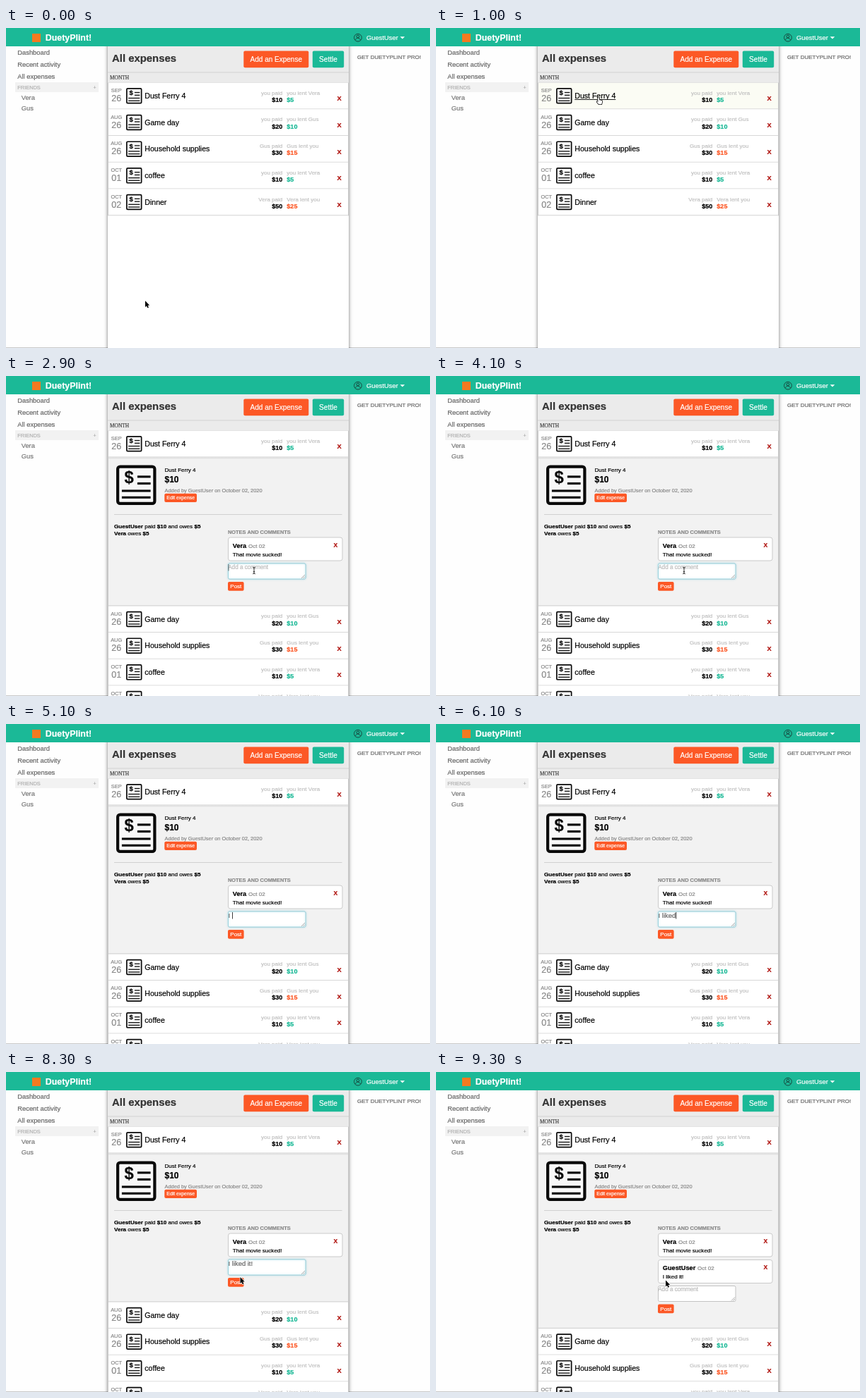
An HTML page with a canvas for the animation above (9500 ms loop, 600 by 454 pixels).

```html
<!DOCTYPE html>
<html lang="en">
<head>
<meta charset="utf-8">
<title>All expenses</title>
<style>
html, body { margin: 0; width: 100%; height: 100%; overflow: hidden; background: #fff; }
canvas { display: block; width: 600px; height: 454px; }
</style>
</head>
<body>
<canvas id="stage" width="600" height="454"></canvas>
<script>
const ctx = document.getElementById('stage').getContext('2d');
const LOOP = 9500, STEP = 100;
const TEAL = '#1bb997', ORANGE = '#fc5826', RED = '#b01410';
const OPEN_AT = 1100, FOCUS_AT = 2300, POST_AT = 8700;
const ROW_TOP = 77.7, ROW_H = 37.7, CARD_H = 37.5;
const NAME = 'GuestUser', FRIEND = 'Vera', MOVIE = 'Dust Ferry 4', COMMENT = 'I liked it!';

const rows = [
  ['SEP', '26', MOVIE, 'you paid', '$10', 'you lent Vera', '$5', TEAL],
  ['AUG', '26', 'Game day', 'you paid', '$20', 'you lent Gus', '$10', TEAL],
  ['AUG', '26', 'Household supplies', 'Gus paid', '$30', 'Gus lent you', '$15', ORANGE],
  ['OCT', '01', 'coffee', 'you paid', '$10', 'you lent Vera', '$5', TEAL],
  ['OCT', '02', 'Dinner', 'Vera paid', '$50', 'Vera lent you', '$25', ORANGE]
];
// Time of each key press in the comment box
const keys = [4800, 4900, 5700, 5800, 5900, 6000, 6100, 6300, 6500, 6700, 6900];
// Pointer path: time, x, y
const path = [
  [0, 197, 387], [1000, 229, 98.5], [1600, 229, 98.5], [2300, 351, 276], [7600, 351, 276],
  [8000, 342, 302], [8300, 331.5, 291], [8600, 325, 295.5], [LOOP, 325, 295.5]
];

// A hairline stroke gives the slightly heavy look of smoothed type
function text(str, x, y, size, color, o = {}) {
  ctx.font = `${o.bold ? 'bold ' : ''}${size}px ${o.serif ? '"Liberation Serif", serif' : '"Liberation Sans", Arial, sans-serif'}`;
  ctx.textAlign = o.align || 'left';
  ctx.fillStyle = ctx.strokeStyle = color;
  ctx.lineWidth = 0.2;
  ctx.fillText(str, x, y);
  ctx.strokeText(str, x, y);
  return x + ctx.measureText(str).width;
}

// Alternates bold and plain pieces on one line
function mixed(parts, x, y, size) {
  parts.forEach((p, i) => { x = text(p, x, y, size, '#000', { bold: i % 2 === 0 }); });
}

function rect(x, y, w, h, color) {
  ctx.fillStyle = color;
  ctx.fillRect(x, y, w, h);
}

function round(x, y, w, h, r, fill, stroke, line = 1) {
  ctx.beginPath();
  ctx.roundRect(x, y, w, h, r);
  if (fill) { ctx.fillStyle = fill; ctx.fill(); }
  if (stroke) { ctx.strokeStyle = stroke; ctx.lineWidth = line; ctx.stroke(); }
}

function poly(points, fill, stroke, line = 1) {
  ctx.beginPath();
  points.forEach(([x, y]) => ctx.lineTo(x, y));
  ctx.closePath();
  if (stroke) { ctx.strokeStyle = stroke; ctx.lineWidth = line; ctx.stroke(); }
  ctx.fillStyle = fill;
  ctx.fill();
}

function button(label, x, y, w, h, size, color, base) {
  round(x, y, w, h, 2, color);
  text(label, x + w / 2, base, size, '#fff', { align: 'center' });
}

function receipt(x, y, s) {
  const w = s * 0.075;
  round(x + w / 2, y + w / 2, s - w, s - w, s * 0.06, '#f8f8f8', '#0a0a0a', w);
  text('$', x + s * 0.32, y + s * 0.46, s * 0.42, '#0a0a0a', { bold: true, align: 'center' });
  [[0.53, 0.29], [0.53, 0.46], [0.14, 0.645], [0.14, 0.81]].forEach(([a, b]) =>
    rect(x + s * a, y + s * (b - 0.028), s * (0.86 - a), s * 0.056, '#0a0a0a'));
}

function sidebar() {
  ['Dashboard', 'Recent activity', 'All expenses'].forEach((s, i) =>
    text(s, 16.3, 38.3 + i * 16.8, 9.35, '#666'));
  rect(13, 77, 118, 14, '#f2f2f2');
  text('FRIENDS', 16.3, 86.7, 7.4, '#b0b0b0');
  text('+', 123.5, 86.5, 7, '#aaa');
  text(FRIEND, 21.7, 101.8, 9.35, '#777');
  text('Gus', 21.7, 116.8, 9.35, '#777');
  text('GET DUETYPLINT PRO!', 497, 44, 8, '#666');
}

function topbar() {
  rect(0, 0, 600, 26, TEAL);
  rect(37, 8, 12, 12, '#f47a20');
  text('DuetyPlint!', 55.8, 18.2, 12.4, '#fff', { bold: true });
  ctx.strokeStyle = '#174a40';
  ctx.lineWidth = 1;
  ctx.beginPath();
  ctx.arc(498, 13.7, 5.4, 0, 7);
  ctx.stroke();
  ctx.beginPath();
  ctx.arc(498, 12, 1.9, 0, 7);
  ctx.stroke();
  ctx.beginPath();
  ctx.arc(498, 18, 3.6, Math.PI * 1.1, Math.PI * 1.9);
  ctx.stroke();
  text(NAME, 510, 16.5, 9.4, '#fff');
  poly([[557.7, 12.3], [564.3, 12.3], [561, 15.6]], '#fff');
}

function panel() {
  ctx.save();
  ctx.shadowColor = 'rgba(0,0,0,.55)';
  ctx.shadowBlur = 5;
  rect(144, 20, 341, 460, '#fff');
  ctx.restore();
  rect(144, 26, 341, 52, '#ebebeb');
  rect(144, 62.5, 341, 1, '#d2d2d2');
  rect(144, 77, 341, 1, '#d8d8d8');
  text('All expenses', 150, 48.2, 14.9, '#333', { bold: true });
  button('Add an Expense', 336.3, 32.6, 92, 23.7, 10, ORANGE, 48);
  button('Settle', 433.8, 32.6, 44.4, 23.7, 10.1, TEAL, 48);
  text('MONTH', 147, 73, 7.4, '#444', { serif: true });
}

function drawRow([month, day, title, paid, sum, lent, share, color], y, hover) {
  rect(144, y, 341, ROW_H, hover ? '#fbfcf4' : '#fff');
  rect(144, y + ROW_H - 1, 341, 1, '#d4d4d4');
  text(month, 156.2, y + 13.3, 7.4, '#888', { align: 'center' });
  text(day, 156.2, y + 26.3, 12.5, '#888', { align: 'center' });
  receipt(170, y + 7.3, 22.5);
  const end = text(title, 196.3, y + 22.2, 10.55, '#000');
  if (hover) rect(196.3, y + 23.3, end - 196.3, 1, '#222');
  text(paid, 391.3, y + 17, 8.05, '#c0c0c0', { align: 'right' });
  text(sum, 391.3, y + 27.3, 9.1, '#000', { bold: true, align: 'right' });
  text(lent, 397.3, y + 17, 8.05, '#c0c0c0');
  text(share, 397.3, y + 27.3, 9.1, color, { bold: true });
  text('X', 468.5, y + 25.5, 9.3, RED, { bold: true });
}

function card(name, body, y) {
  round(314.5, y + 0.5, 161.5, 33, 3, '#fff', '#cacaca');
  const end = text(name, 320.8, y + 15, 9.2, '#000', { bold: true });
  text('Oct 02', end + 2.8, y + 15, 8, '#888');
  text(body, 320.8, y + 27, 8.05, '#000');
  text('X', 463.6, y + 14.2, 8.6, RED, { bold: true });
}

// Blink restarts at each key press, with short fades
function caretAlpha(t) {
  if (t < 2500 || t >= 8300) return 0;
  const age = t - keys.reduce((last, k) => (k <= t ? k : last), 2500);
  if (age < 400) return 1;
  const p = age % 1000;
  if (p <= 200) return (p + 100) / 300;
  return p < 400 ? 1 : Math.max(0, (600 - p) / 267);
}

function commentBox(t, y) {
  const focus = t >= POST_AT ? 0 : Math.max(0, Math.min(1, (t - FOCUS_AT) / 300));
  round(314.5, y + 0.5, 109.5, 22, 2, '#fff', '#c2c2c2');
  if (focus) {
    ctx.save();
    ctx.globalAlpha = focus;
    ctx.shadowColor = 'rgba(110,200,220,.45)';
    ctx.shadowBlur = 3;
    round(314.5, y + 0.5, 109.5, 22, 2, '#fff', '#a2d6e0');
    ctx.restore();
  }
  ctx.strokeStyle = '#888';
  ctx.lineWidth = 0.7;
  ctx.beginPath();
  for (const d of [5, 2.5]) {
    ctx.moveTo(423 - d, y + 21.5);
    ctx.lineTo(423, y + 21.5 - d);
  }
  ctx.stroke();
  const typed = t >= POST_AT ? '' : COMMENT.slice(0, keys.filter(k => k <= t).length);
  let end = 314.3;
  if (typed) end = text(typed, 314.6, y + 9.2, 9.4, '#666');
  else text('Add a comment', 314.2, y + 8.2, 8.15, '#bbb');
  const a = caretAlpha(t);
  if (a) rect(end + 0.2, y + 1.5, 0.9, 9.5, `rgba(40,40,40,${a})`);
}

function details(t, bottom) {
  const top = ROW_TOP + ROW_H;
  rect(144, top, 341, bottom - top, '#f2f2f2');
  const g = ctx.createLinearGradient(0, top, 0, top + 3);
  g.addColorStop(0, 'rgba(0,0,0,.1)');
  g.addColorStop(1, 'rgba(0,0,0,0)');
  rect(144, top, 341, 3, g);
  rect(144, bottom - 1, 341, 1, '#cfcfcf');
  receipt(156, 126.5, 56.5);
  text(MOVIE, 224.5, 135.5, 8, '#000');
  text('$10', 224.5, 151.3, 12, '#000', { bold: true });
  text(`Added by ${NAME} on October 02, 2020`, 224.5, 164.6, 7.4, '#888');
  button('Edit expense', 224.3, 166.8, 45.7, 12.2, 6.85, ORANGE, 175.4);
  rect(153, 196, 322.5, 1, '#d0d0d0');
  mixed([NAME, ' paid ', '$10', ' and owes ', '$5'], 153, 216.3, 8.1);
  mixed([FRIEND, ' owes ', '$5'], 153, 225.7, 8.1);
  text('NOTES AND COMMENTS', 314, 224, 7.4, '#888', { bold: true });
  card(FRIEND, 'That movie sucked!', 228.5);
  let y = 265.5;
  if (t >= POST_AT) {
    card(NAME, COMMENT, y + 0.5);
    y += CARD_H;
  }
  commentBox(t, y);
  button('Post', 314, y + 26.5, 22.6, 12.7, 8, ORANGE, y + 35.6);
}

function pointer(t) {
  const i = path.findIndex(p => p[0] > t);
  const [t0, x0, y0] = path[i - 1], [t1, x1, y1] = path[i];
  const k = (t - t0) / (t1 - t0), e = k * k * (3 - 2 * k);
  return [x0 + (x1 - x0) * e, y0 + (y1 - y0) * e];
}

function drawPointer(x, y, kind) {
  ctx.save();
  ctx.translate(x, y);
  ctx.lineJoin = 'round';
  if (kind === 'beam') {
    ctx.strokeStyle = '#222';
    ctx.lineWidth = 0.9;
    ctx.beginPath();
    for (const s of [-1, 1]) {
      ctx.moveTo(-1.8, 4.8 * s);
      ctx.quadraticCurveTo(0, 4.8 * s, 0, 3.4 * s);
      ctx.quadraticCurveTo(0, 4.8 * s, 1.8, 4.8 * s);
    }
    ctx.moveTo(0, -4);
    ctx.lineTo(0, 4);
    ctx.moveTo(-1.2, 1.5);
    ctx.lineTo(1.2, 1.5);
    ctx.stroke();
  } else if (kind === 'hand') {
    ctx.scale(0.85, 0.85);
    poly([[0, 1], [1, 0.4], [2, 1], [2.3, 4.4], [4, 4.3], [5.6, 4.9], [7, 5.6], [7.2, 8],
      [6.2, 11.5], [1.6, 11.5], [-1.6, 7.6], [-1.5, 6.4], [-0.3, 6.7], [0.5, 7.5]], '#fff', '#111', 1.8);
  } else {
    poly([[0, 0], [0, 9], [2, 7.2], [3.4, 10.2], [4.9, 9.5], [3.6, 6.6], [6.2, 6.4]], '#000', '#fff', 1.4);
  }
  ctx.restore();
}

function draw(t) {
  const open = t >= OPEN_AT;
  const [x, y] = pointer(t);
  const onLink = x > 196 && x < 256 && y > 90 && y < 104;
  const onBox = open && t < POST_AT && x > 314 && x < 424 && y > 266 && y < 288;
  const shift = open ? 211 + (t >= POST_AT ? CARD_H : 0) : 0;

  rect(0, 0, 600, 454, '#fefefe');
  sidebar();
  rect(0, 453, 600, 1, '#c8c8c8');
  panel();
  rows.forEach((row, i) => drawRow(row, ROW_TOP + i * ROW_H + (i ? shift : 0), !i && onLink));
  if (open) details(t, ROW_TOP + ROW_H + shift);
  const end = Math.min(454, ROW_TOP + rows.length * ROW_H + shift);
  for (const edge of [144, 484]) rect(edge, ROW_TOP, 1, end - ROW_TOP, '#cccccc');
  topbar();
  if (t < keys[0] || t > 7600) drawPointer(x, y, onLink ? 'hand' : onBox ? 'beam' : 'arrow');
}

const start = performance.now();
function tick() {
  const t = (performance.now() - start) % LOOP;
  draw(Math.floor(t / STEP) * STEP);
  requestAnimationFrame(tick);
}
tick();
</script>
</body>
</html>
```
